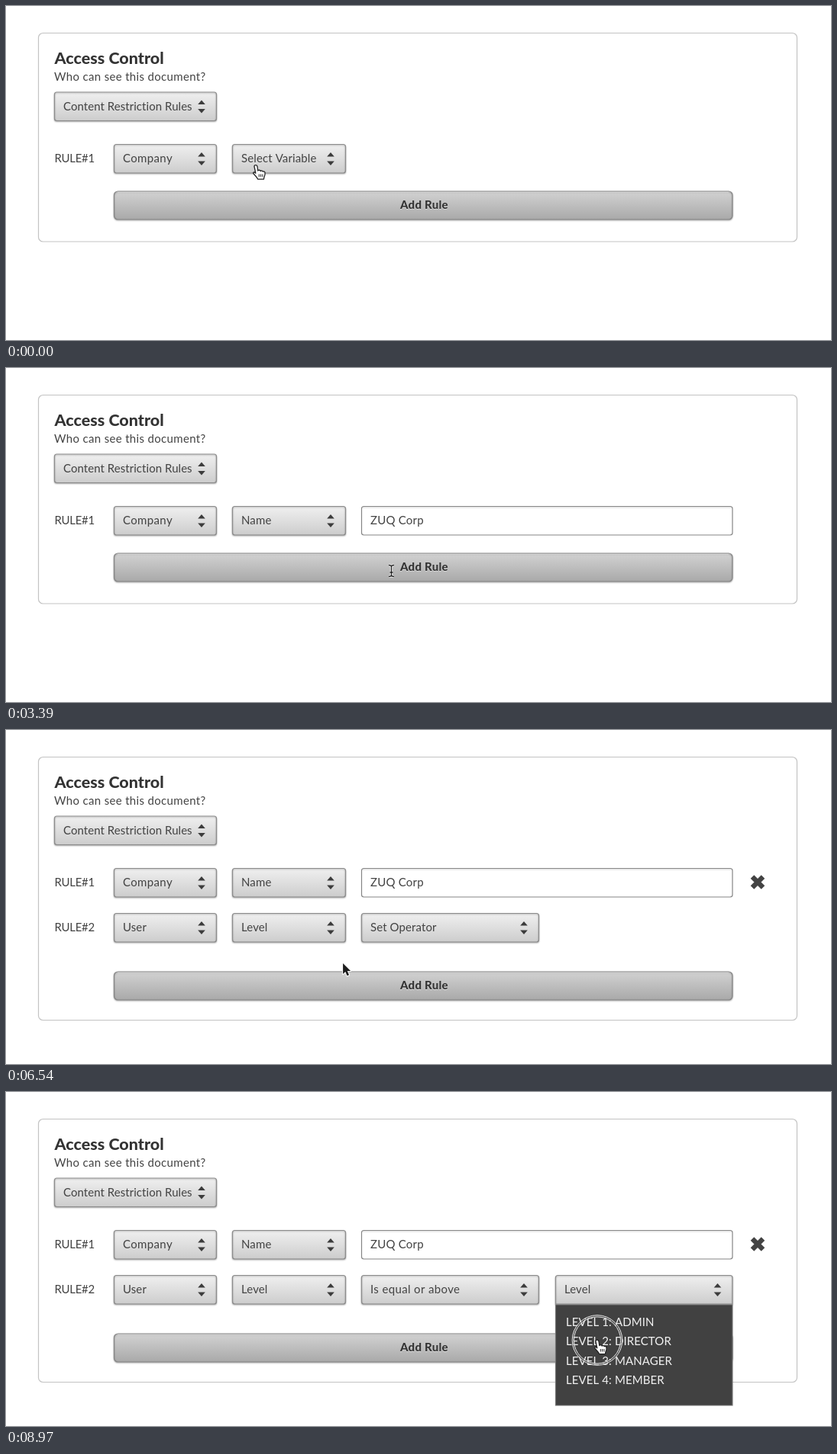
An HTML page with a canvas that plays this animation: 1080x438 px, repeating every 9 s.

```html
<!DOCTYPE html>
<html lang="en">
<head>
<meta charset="utf-8">
<title>Access Control</title>
<style>
html, body { margin: 0; width: 100%; height: 100%; overflow: hidden; background: #fff; }
canvas { display: block; width: 1080px; height: 438px; }
</style>
</head>
<body>
<canvas id="stage" width="1080" height="438"></canvas>
<script>
const ctx = document.getElementById('stage').getContext('2d');
const LOOP = 9000, STEP = 30;
const INK = '#434343';
const COMPANY = 'ZUQ Corp';
const start = performance.now();

// Pointer stops: time, x, y
const stops = [
  [60, 327, 209], [180, 345, 279], [780, 345, 279], [1350, 341, 251],
  [1530, 341, 251], [1800, 504, 204], [3180, 504, 204], [3390, 504.5, 266],
  [3960, 504.5, 266], [4440, 354, 264], [5220, 354, 264], [5760, 358, 338],
  [6240, 358, 338], [6870, 537, 269], [7380, 537, 269], [7740, 541, 327],
  [8340, 541, 327], [8730, 774, 325.5]
];

// Click rings: from, to
const clicks = [[450, 780], [2130, 2280], [4560, 4710], [5760, 6240], [7770, 8010], [8970, 9000]];

const handShape = new Path2D('M-2 1.5C-2-1 1.5-1 2 1.5L2.8 7C3.5 5.8 5.8 6 6.2 7.5C7.2 6.5 9 7 9.2 8.2' +
  'C10.4 7.5 11.8 8.2 12 9.5C12.5 12 11.5 14 10.8 16L10.5 18L2.8 18.2C1.5 15.5-1 13-3 10.8' +
  'C-4 9.3-2.2 8.4-.8 9.6L-.2 10.2Z');
const handLines = new Path2D('M4.3 11.5V15M6.6 11.5V15M8.9 11.5V15');
const arrowShape = new Path2D('M0 0V14L3.2 11L5.4 16.4L8 15.3L5.7 10.1H10Z');
const beamShape = new Path2D('M-3.5-7.5C-1-7.5 0-6.5 0-5.5C0-6.5 1-7.5 3.5-7.5M0-5.5V5.5' +
  'M-3.5 7.5C-1 7.5 0 6.5 0 5.5C0 6.5 1 7.5 3.5 7.5M-2 2H2');

const clamp = v => Math.max(0, Math.min(1, v));
const ease = v => v * v * (3 - 2 * v);
const progress = (t, a, b) => ease(clamp((t - a) / (b - a)));

function text(str, x, y, { size = 15, weight = 400, color = INK, gap = 0.1 } = {}) {
  ctx.font = `${weight} ${size}px Lato, "Open Sans", sans-serif`;
  ctx.letterSpacing = gap + 'px';
  ctx.fillStyle = color;
  ctx.fillText(str, x, y);
}

function box(x, y, w, h, r, fill, line) {
  ctx.beginPath();
  ctx.roundRect(x, y, w, h, r);
  ctx.fillStyle = fill;
  ctx.fill();
  ctx.strokeStyle = line;
  ctx.lineWidth = 1.2;
  ctx.stroke();
}

function shade(y, h, top, bottom) {
  const g = ctx.createLinearGradient(0, y, 0, y + h);
  g.addColorStop(0, top);
  g.addColorStop(1, bottom);
  return g;
}

function raised(x, y, w, h, r, fill, line) {
  ctx.save();
  ctx.shadowColor = 'rgba(0,0,0,.28)';
  ctx.shadowBlur = 2;
  ctx.shadowOffsetY = 1;
  box(x, y, w, h, r, fill, line);
  ctx.restore();
}

function triangle(x, y, dir) {
  ctx.beginPath();
  ctx.moveTo(x - 4.8, y);
  ctx.lineTo(x + 4.8, y);
  ctx.lineTo(x, y - 5.5 * dir);
  ctx.fill();
}

function select(label, x, y, w, gap, open) {
  raised(x, y, w, 37.5, open ? [3, 3, 0, 0] : 3, shade(y, 37, '#f0f0f0', '#cdcdcd'), '#8b8b8b');
  text(label, x + 11.5, y + 23.5, { gap });
  ctx.fillStyle = '#3c3c3c';
  triangle(x + w - 19.5, y + 16, 1);
  triangle(x + w - 19.5, y + 22, -1);
}

function menu(items, x, y, w, h, inset, first, pitch, shown) {
  if (shown <= 0) return;
  ctx.save();
  ctx.beginPath();
  ctx.rect(x - 2, y - 1, w + 4, (h + 3) * shown);
  ctx.clip();
  box(x, y, w, h, 0, '#414141', '#777');
  items.forEach((s, i) => text(s, x + inset, y + first + i * pitch + 5, { color: '#f2f2f2' }));
  ctx.restore();
}

function addRule(y) {
  raised(141.5, y, 809.5, 37, 5, shade(y, 37, '#d2d2d2', '#a9a9a9'), '#878787');
  ctx.strokeStyle = 'rgba(255,255,255,.45)';
  ctx.lineWidth = 1;
  ctx.beginPath();
  ctx.moveTo(146, y + 1.2);
  ctx.lineTo(946, y + 1.2);
  ctx.stroke();
  const style = { weight: 800, gap: 0.25 };
  text('Add Rule', 516, y + 24, { ...style, color: 'rgba(255,255,255,.5)' });
  text('Add Rule', 516, y + 23, { ...style, color: '#333' });
}

function input(t) {
  box(465.5, 181.5, 485.5, 37.5, 3, '#fff', '#858585');
  ctx.fillStyle = 'rgba(0,0,0,.1)';
  ctx.fillRect(467, 182.2, 482.5, 1.6);
  if (t < 2280) text('Enter company name', 477, 205, { gap: 0.3 });
  else text(COMPANY.slice(0, Math.max(0, Math.floor((t - 2970) / 30) + 1)), 477, 205, { gap: 0.2 });
}

function removeIcon(x, y) {
  ctx.strokeStyle = INK;
  ctx.lineWidth = 6.4;
  ctx.beginPath();
  for (const s of [-1, 1]) {
    ctx.moveTo(x - 7, y - 7 * s);
    ctx.lineTo(x + 7, y + 7 * s);
  }
  ctx.stroke();
}

function pointerAt(t) {
  let i = stops.findIndex(s => s[0] > t);
  if (i === 0) return stops[0].slice(1);
  if (i < 0) return stops[stops.length - 1].slice(1);
  const [t0, x0, y0] = stops[i - 1], [t1, x1, y1] = stops[i];
  const k = progress(t, t0, t1);
  return [x0 + (x1 - x0) * k, y0 + (y1 - y0) * k];
}

function pointerKind(t, x, y) {
  if (t < 780) return 'hand';
  if (t < 2130) return 'arrow';
  if (t < 3480) return 'beam';
  if (t < 6240) return x < 445 ? 'hand' : 'arrow';
  if (t < 8010) return t > 7380 && y > 288 ? 'hand' : 'arrow';
  return x > 719 ? 'hand' : 'arrow';
}

function ring(x, y, alpha) {
  ctx.save();
  ctx.globalAlpha = alpha;
  ctx.lineWidth = 1;
  for (const [r, color] of [[31.7, '#555'], [32.8, '#e8e8e8'], [30.6, '#e8e8e8']]) {
    ctx.beginPath();
    ctx.arc(x, y, r, 0, Math.PI * 2);
    ctx.strokeStyle = color;
    ctx.stroke();
  }
  ctx.restore();
}

function pointer(t) {
  const [x, y] = pointerAt(t);
  const click = clicks.find(([a, b]) => t >= a && t < b);
  if (click) ring(x, y, t - click[0] < STEP && t < 8900 ? 0.6 : 1);
  const kind = pointerKind(t, x, y);
  ctx.save();
  ctx.translate(x, y);
  ctx.lineJoin = 'round';
  if (kind === 'hand') {
    ctx.fillStyle = '#fff';
    ctx.strokeStyle = '#222';
    ctx.lineWidth = 1.3;
    ctx.fill(handShape);
    ctx.stroke(handShape);
    ctx.lineWidth = 1;
    ctx.stroke(handLines);
  } else if (kind === 'arrow') {
    ctx.strokeStyle = '#fff';
    ctx.lineWidth = 2;
    ctx.stroke(arrowShape);
    ctx.fillStyle = '#1c1c1c';
    ctx.fill(arrowShape);
  } else {
    ctx.strokeStyle = '#eee';
    ctx.lineWidth = 3.2;
    ctx.stroke(beamShape);
    ctx.strokeStyle = '#222';
    ctx.lineWidth = 1.3;
    ctx.stroke(beamShape);
  }
  ctx.restore();
}

function menus(t) {
  if (t < 780)
    menu(['TYPE', 'NAME', 'SIZE', 'REGION'], 296.5, 219.5, 148, 149, 21.5, 29.5, 30.5, progress(t, 30, 180));
  if (t < 6240)
    menu(['NAME', 'LEVEL'], 296.5, 279, 148, 92, 21.5, 29.5, 30.5, progress(t, 4680, 4890));
  if (t < 8010)
    menu(['IS EQUAL', 'IS EQUAL OR ABOVE', 'IS EQUAL OR BELOW', 'IS BELOW', 'IS ABOVE', 'IS NOT'],
      465.5, 279, 232, 190, 13.5, 23, 25.3, progress(t, 6840, 6990));
  menu(['LEVEL 1: ADMIN', 'LEVEL 2: DIRECTOR', 'LEVEL 3: MANAGER', 'LEVEL 4: MEMBER'],
    719.5, 279, 231.5, 132, 13.5, 23, 25.3, progress(t, 8010, 8190));
}

function draw(t) {
  const two = t >= 3480;
  ctx.fillStyle = '#fff';
  ctx.fillRect(0, 0, 1080, 438);
  box(42.5, 35.5, 993, two ? 345 : 273.5, 6, '#fff', '#c3c3c3');
  text('Access Control', 63.5, 76, { size: 21.5, weight: 800, color: '#333', gap: 0 });
  text('Who can see this document?', 63, 98, { gap: 0.33 });
  select('Content Restriction Rules', 63.5, 113, 212, 0.05);

  text('RULE#1', 63.5, 205, { gap: -0.3 });
  select('Company', 141.5, 181.5, 134, 0.36);
  const named = t >= 780;
  select(named ? 'Name' : 'Select Variable', 296.5, 181.5, 148, 0.12, t >= 60 && !named);
  if (named) input(t);
  addRule(two ? 317 : 243);

  if (two) {
    removeIcon(984, 199.5);
    text('RULE#2', 63.5, 264, { gap: -0.3 });
    select('User', 141.5, 240.5, 134, 0.1);
    const levelSet = t >= 6240, opSet = t >= 8010;
    select(levelSet ? 'Level' : 'Select Variable', 296.5, 240.5, 148, 0.12, t >= 4710 && !levelSet);
    if (levelSet)
      select(opSet ? 'Is equal or above' : 'Set Operator', 465.5, 240.5, 232, opSet ? 0.36 : 0.1, t >= 6870 && !opSet);
    if (opSet) select('Level', 719.5, 240.5, 231.5, 0.1, true);
  }
  menus(t);
  pointer(t);
}

function tick() {
  const t = (performance.now() - start) % LOOP;
  draw(Math.floor(t / STEP) * STEP);
  requestAnimationFrame(tick);
}
tick();
</script>
</body>
</html>
```
